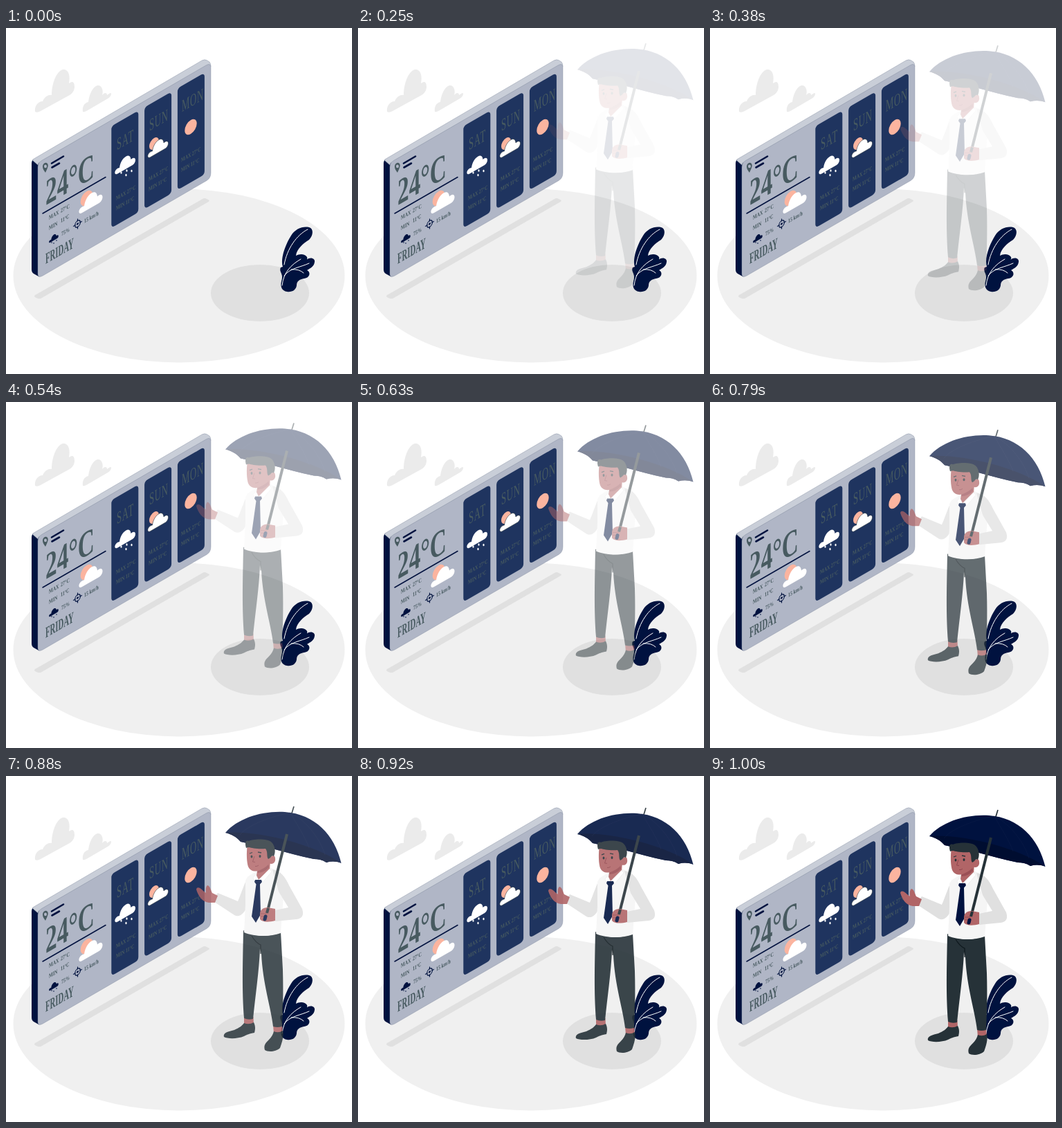
Animation of 500x500 px, one loop 1040 ms. Source, as an HTML page:

```html
<!DOCTYPE html>
<html lang="en">
<head>
<meta charset="utf-8">
<title>Weather panel</title>
<style>
html, body { margin: 0; width: 100%; height: 100%; overflow: hidden; background: #fff; }
svg { display: block; width: 100vw; height: 100vh; }
text { font-family: "Liberation Serif", "Times New Roman", serif; fill: #475a60; }
.navy { fill: #00123f; }
.line { fill: none; stroke: #00123f; stroke-linecap: round; }
.skin { fill: #b16567; }
.dark { fill: #263238; }
.vein { fill: none; stroke: #fff; stroke-width: 1; stroke-linecap: round; }
</style>
</head>
<body>
<svg viewBox="0 0 500 500">
  <defs>
    <path id="cloud" d="M4 0C-1 0-1-8 5-7.500Q6-7.500 7-7C8-14 12-18 16.500-18C21-18 23-14 23.500-9.500C27-11 30-8.500 30-5C30-2 28 0 26 0Z"/>
  </defs>

  <!-- floor and shadows -->
  <ellipse cx="250" cy="358" rx="239.500" ry="125.500" fill="#f0f0f0"/>
  <ellipse cx="367" cy="383" rx="71" ry="41" fill="#e0e0e0"/>
  <path d="M42 386L284 247Q287 245 290 247L293 248.500Q295 250 292 251.500L51 390.500Q48 392 45 390.500L42 389Q40 387.500 42 386Z" fill="#e0e0e0"/>

  <!-- sky -->
  <g fill="#ebebeb">
    <path d="M42 121C41 113 46 106 53 106C55 101 60 96 66 97C66 82 72 63 82 60C91 59 93 70 91 80C96 76 99 78 99 85C99 91 95 96 90 98L50 120Q45 123 42 121Z"/>
    <path d="M111 121C110 114 113 108 119 107C120 97 125 85 132 83C139 82 141 91 139 97C142 93 146 93 146 97Q152 92 152 95Q152 99 147 102L117 119.500Q113 122 111 121Z"/>
  </g>

  <!-- panel body -->
  <path class="navy" d="M37 196Q37 191 40 189.500L48 193V359.500L40 355Q37 353 37 349Z"/>
  <path d="M38 191Q40 189 42 188L283 47Q287 45 290 46.500L294 49Q296 51 296 56L290 54.500L52 191.500Q47 194 46 198Z" fill="#c9ced8" stroke="#7d879b" stroke-width=".4"/>
  <path d="M46 201Q46 195 51 192L289 54Q296 50 296 57V209Q296 217 290 220.500L53 358Q46 362 46 355Z" fill="#b0b6c6" stroke="#7d879b" stroke-width=".4"/>
  <g id="panel"></g>
  <path class="line" d="M53 268L144 215.500" stroke-width="1.500"/>
  <path class="line" d="M66 195.500L83 185.500M66.500 201.500L77 195.500" stroke-width="2.600"/>
  <path d="M57 209C54 205 52.800 202.500 53 199.500C53.500 196 56 194.500 58 194.800C60.500 195.500 61.300 198 60.500 200.500Q59.500 204 57 209ZM57 202.300A2 2.400 0 1 0 57 197.500A2 2.400 0 1 0 57 202.300Z" fill="#475a60" fill-rule="evenodd"/>
  <g transform="matrix(1 -.577 0 1 103.500 283)">
    <path class="line" d="M-6 0H-3M6 0H3M0-7V-4M0 7V4" stroke-width="1.200"/>
    <ellipse class="line" rx="3.900" ry="4.600" stroke-width="1.100"/>
    <circle class="navy" r="1.500"/>
  </g>

  <!-- plant -->
  <path class="navy" d="M400 345C396 332 405 311 412 300C418 290 429 286 438 288C445 290 444 300 438 306C430 311 420 319 419 329C424 326 432 326 435 331Q436 334 434 335C440 330 447 333 446 338C445 345 440 347 435 350C441 353 439 361 431 362C424 363 420 366 420 372C419 379 413 382 406 381C399 380 396 374 398 366Q400 360 398 355Q395 349 397 346Z"/>
  <path class="vein" d="M402 342C406 319 420 299 436 291M399 372C401 353 412 342 426 334M402 358C410 347 425 346 438 340M412 349Q424 348 430 354"/>

  <g id="man">
    <!-- umbrella -->
    <path d="M416 49L412 62" fill="none" stroke="#263238" stroke-width="1.700"/>
    <path class="navy" d="M317 87C335 66 370 55 403 57C446 60 475 90 484.500 131C477 128 470 128 463 130C457 126 451 125 445 125C425 121 405 115 385 110L339 100C333 93 326 89 317 87Z"/>
    <path d="M317 87C355 83 440 100 484.500 131C477 128 470 128 463 130C457 126 451 125 445 125C425 121 405 115 385 110L339 100C333 93 326 89 317 87Z" fill="#000d30"/>
    <path d="M411 58C385 63 350 75 338 90M411 58C435 70 455 98 461 119M411 58C420 75 432 92 438 109" fill="none" stroke="#14234c" stroke-width=".4"/>

    <!-- legs -->
    <path class="skin" d="M344 353H357.500L358 364L344 365ZM386 365H399L400 376L387 377Z"/>
    <path class="dark" d="M344 362Q351 365 358 361C361 367 360 372 359 376C352 377 348 379 344 381C335 385 320 385 315 382C313 376 322 374 330 372C337 369 341 366 344 362ZM387 374Q394 377 400 373C402 380 399 390 396 398C390 404 378 404 374 401C372 394 375 391 380 386C384 382 386 378 387 374Z"/>
    <path class="dark" d="M343 228C358 238 383 238 397 230L400 285C401 320 400 345 399 367Q392 369 386 367C383 340 371 305 369 262L367 254C366 285 360 325 357 356Q350 358 344 355C341 315 342 280 343 228Z"/>
    <path d="M355 236Q361 246 368 249L368 262" fill="none" stroke="#0d171c" stroke-width="1.200"/>

    <!-- shirt -->
    <path d="M350 150C344 161 341 172 335 186L306 174Q301 179 301 187L330 206C338 210 344 203 348 195L354 165Z" fill="#e0e0e0"/>
    <path d="M346 156C350 147 357 147 362 142L381 137C394 142 402 150 402 165L397 232C381 238 358 237 344 231L346 190Z" fill="#f5f5f5"/>
    <path d="M385 140C397 142 403 150 409 163L428 197C431 206 428 211 420 212L389 215V199L408 195L394 172Z" fill="#e0e0e0"/>

    <!-- head -->
    <path class="skin" d="M364 136L382 128L381 141Q374 150 365 155Q361 153 362 149Z"/>
    <path d="M364 141Q374 139 379 132L380 137Q373 145 363 145Z" fill="#9a4f55"/>
    <path class="skin" d="M349 104C347 117 348 130 350 136C353 143 361 144 367 141C374 138 379 134 380 131C386 134 390 129 389 124C389 120 386 119 384 121L382 104Z"/>
    <path class="dark" d="M347 109C345 102 346 97 351 99C357 96 378 95 384 101C389 106 390 115 387 121Q384 119 382 123L379 125C376 121 379 115 375 110C364 111 355 109 351 108Q349 108 347 109Z"/>
    <g class="dark">
      <ellipse cx="355" cy="121.500" rx="1.400" ry="2"/>
      <ellipse cx="367" cy="121" rx="1.500" ry="2"/>
    </g>
    <path d="M352 117L356 115.500M364 115L369 116" fill="none" stroke="#263238" stroke-width="1.300"/>
    <path d="M359 121L356.500 129L360 129.500M360 135.500Q363 136 365 134" fill="none" stroke="#8a3d47" stroke-width=".8"/>

    <!-- collar and tie -->
    <path d="M361 147L365 155L381 139L384 143L370 160L365 156L360 160L357 152Z" fill="#fff" stroke="#dcdcdc" stroke-width=".4"/>
    <path class="navy" d="M360 155H369L370 158L367 161.500L368 205L361 217L355 208L361.500 161.500L359 158Z"/>

    <!-- handle and hands -->
    <path d="M406 89L378 200" fill="none" stroke="#263238" stroke-width="4"/>
    <path class="skin" d="M389 197L378 195C371 195 367 199 367 204L367 212C371 217 381 216 389 214Z"/>
    <path d="M379 196L377 203" fill="none" stroke="#263238" stroke-width="4"/>
    <path d="M368 204H377M368 208H376" fill="none" stroke="#8a3d47" stroke-width=".7"/>
    <path class="line" d="M375 208L374 212" stroke-width="5"/>
    <path class="skin" d="M302 188L293 188C284 187 278 179 275 169C276 164 281 167 285 171L289 174Q288 165 291 163C295 164 296 170 298 174L306 178Z"/>
  </g>
</svg>
<script>
const SLOPE = Math.tan(Math.PI / 6), CORAL = "#fbb49f";
const iso = (x, y, sx = 1, sy = 1) => `transform="matrix(${sx} ${-SLOPE * sx} 0 ${sy} ${x} ${y})"`;
const label = (x, y, size, sx, str, extra = 'font-weight="bold"') =>
  `<text ${iso(x, y, sx)} font-size="${size}" ${extra}>${str}</text>`;
const small = (x, y, str) => label(x, y, 8.6, .7, str);
const cloud = (x, y, k, style = 'fill="#fff"') => `<use href="#cloud" ${iso(x, y, k, k)} ${style}/>`;
const sun = (x, y, r) => `<ellipse ${iso(x, y)} rx="${r}" ry="${r * 1.15}" fill="${CORAL}"/>`;
const drops = (points, r, fill) =>
  points.map(([x, y]) => `<ellipse cx="${x}" cy="${y}" rx="${r}" ry="${r * 1.7}" fill="${fill}"/>`).join("");

function card(day, i) {
  const x = 152.3 + 47.8 * i, y = 142 - 27.4 * i;
  const tx = 159 + 47 * i, ty = 249 - 27.6 * i;
  return `<rect ${iso(x, y)} width="39" height="147" rx="5" fill="#1f345f"/>`
    + label(tx + 1, ty - 72.5, 24.5, .52, day, 'letter-spacing="1.5"')
    + small(tx, ty, "MAX 27°C") + small(tx, ty + 14.5, "MIN 11°C");
}

document.getElementById("panel").innerHTML =
  ["SAT", "SUN", "MON"].map(card).join("")
  + cloud(157, 213, 1) + drops([[166.5, 209], [173.5, 212.5], [174.5, 206], [181.5, 206.5]], 1.1, "#fff")
  + sun(214, 167, 7) + cloud(204.5, 189, 1, 'fill="#fff" stroke="#263238" stroke-width=".5"')
  + sun(267, 143, 8.7)
  + sun(116.5, 246, 8.8) + cloud(105, 270, 1.15)
  + cloud(62, 311, .46, 'class="navy"') + drops([[66, 310], [69, 311], [73, 307]], .6, "#00123f")
  + label(57, 256.5, 53, .63, "24°C")
  + label(57, 341, 22, .49, "FRIDAY")
  + small(62, 277, "MAX") + small(79, 267, "27°C")
  + small(62, 292, "MIN") + small(79, 281.5, "11°C")
  + small(80, 300.5, "75%") + small(113, 282, "15 km/h");

// Cubic ease-in: bezier(.42, 0, 1, 1)
function easeIn(x) {
  let lo = 0, hi = 1;
  for (let i = 0; i < 30; i++) {
    const u = (lo + hi) / 2;
    if (1.26 * u * (1 - u) ** 2 + 3 * u * u * (1 - u) + u ** 3 < x) lo = u; else hi = u;
  }
  return 3 * lo * lo - 2 * lo ** 3;
}

const LOOP = 1040, FPS = 24, DROP = 30;
const man = document.getElementById("man");
const start = performance.now();

function draw() {
  const t = Math.max(0, performance.now() - start) % LOOP;
  const step = Math.min(FPS, Math.floor((t + 5) * FPS / 1000));
  // Each step shows the pose at its middle
  const p = step < 4 ? 0 : easeIn(Math.min(1, (step + .5) / FPS));
  man.setAttribute("opacity", p);
  man.setAttribute("transform", `translate(0 ${DROP * (p - 1)})`);
  requestAnimationFrame(draw);
}
draw();
</script>
</body>
</html>
```
